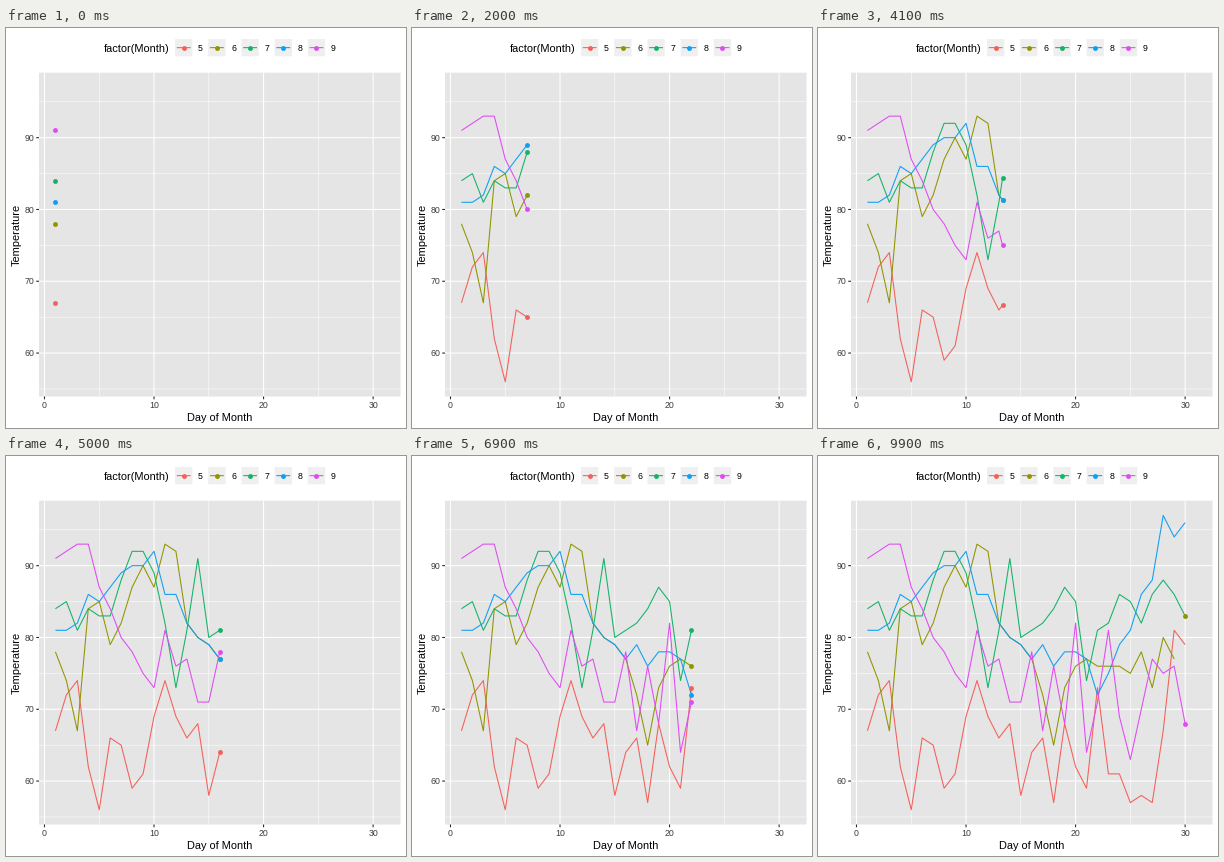
Animation, 400 px wide and 400 px high, one loop 10000 ms. Source, as a matplotlib script:

```python
import matplotlib.pyplot as plt
from matplotlib.animation import FuncAnimation
from matplotlib.patches import Rectangle
import numpy as np

plt.rcParams["font.family"] = "Liberation Sans"
PT = 0.72  # points per pixel at 100 dpi
FRAMES = 100

# Daily temperatures, one list per month
may = [67, 72, 74, 62, 56, 66, 65, 59, 61, 69, 74, 69, 66, 68, 58, 64,
       66, 57, 68, 62, 59, 73, 61, 61, 57, 58, 57, 67, 81, 79, 76]
june = [78, 74, 67, 84, 85, 79, 82, 87, 90, 87, 93, 92, 82, 80, 79, 77,
        72, 65, 73, 76, 77, 76, 76, 76, 75, 78, 73, 80, 77, 83]
july = [84, 85, 81, 84, 83, 83, 88, 92, 92, 89, 82, 73, 81, 91, 80, 81,
        82, 84, 87, 85, 74, 81, 82, 86, 85, 82, 86, 88, 86, 83, 81]
august = [81, 81, 82, 86, 85, 87, 89, 90, 90, 92, 86, 86, 82, 80, 79, 77,
          79, 76, 78, 78, 77, 72, 75, 79, 81, 86, 88, 97, 94, 96, 94]
september = [91, 92, 93, 93, 87, 84, 80, 78, 75, 73, 81, 76, 77, 71, 71, 78,
             67, 76, 68, 82, 64, 71, 81, 69, 63, 70, 77, 75, 76, 68]
months = [may, june, july, august, september]
colors = ["#f5605a", "#929500", "#15b368", "#0f9ff4", "#e04cf2"]

# Panel box in pixels and its data ranges
LEFT, RIGHT, TOP, BOTTOM = 33.0, 394.5, 44.7, 368.5
X0, X1, Y0, Y1 = -0.5, 32.5, 53.95, 99.05


def px(day):
    return LEFT + (np.asarray(day) - X0) / (X1 - X0) * (RIGHT - LEFT)


def py(temp):
    return BOTTOM - (np.asarray(temp) - Y0) / (Y1 - Y0) * (BOTTOM - TOP)


fig = plt.figure(figsize=(4, 4), dpi=100, facecolor="white")
ax = fig.add_axes([0, 0, 1, 1])
ax.set(xlim=(0, 400), ylim=(400, 0))
ax.axis("off")


def stroke(xs, ys, color, width=1.07, z=2):
    return ax.plot(xs, ys, color=color, lw=width * PT, zorder=z, snap=False,
                   solid_capstyle="butt", solid_joinstyle="round")[0]


def dot(x, y, color, z):
    return ax.plot([x], [y], "o", color=color, ms=4.9 * PT, mew=0,
                   zorder=z, snap=False)[0]


def box(x, y, w, h, color):
    ax.add_patch(Rectangle((x, y), w, h, fc=color, lw=0, zorder=1, snap=False))


def label(x, y, s, size=8.8, color="black", ha="center", **kw):
    ax.text(x, y, s, fontsize=size * PT, color=color, ha=ha, va="baseline", **kw)


# Panel, grid and axes
box(LEFT, TOP, RIGHT - LEFT, BOTTOM - TOP, "#e5e5e5")
for d in (5, 15, 25):
    stroke([px(d)] * 2, [TOP, BOTTOM], "white", 0.53)
for t in (55, 65, 75, 85, 95):
    stroke([LEFT, RIGHT], [py(t)] * 2, "white", 0.53)
for d in (0, 10, 20, 30):
    stroke([px(d)] * 2, [TOP, BOTTOM], "white", z=3)
    stroke([px(d)] * 2, [BOTTOM, BOTTOM + 2.75], "#262626", z=3)
    label(px(d), 380.1, str(d), color="#3c3c3c")
for t in (60, 70, 80, 90):
    stroke([LEFT, RIGHT], [py(t)] * 2, "white", z=3)
    stroke([LEFT - 2.75, LEFT], [py(t)] * 2, "#262626", z=3)
    label(28.1, py(t) + 3.15, str(t), color="#3c3c3c", ha="right")
mid_x = (LEFT + RIGHT) / 2
label(mid_x, 392.8, "Day of Month", 11)
label(13.4, (TOP + BOTTOM) / 2, "Temperature", 11,
      rotation=90, rotation_mode="anchor")

# Legend
KEY = 17.28
label(98, 23.6, "factor(Month)", 11, ha="left")
for k, color in enumerate(colors):
    x = 169.05 + 33.2 * k
    box(x, 11, KEY, KEY, "#efefef")
    stroke([x + 0.1 * KEY, x + 0.9 * KEY], [19.64] * 2, color, z=3)
    dot(x + KEY / 2, 19.64, color, 4)
    label(x + KEY + 5.5, 22.8, str(5 + k), ha="left")

lines = [stroke([], [], c, z=5 + k) for k, c in enumerate(colors)]
dots = [dot(0, 0, c, 20 + k) for k, c in enumerate(colors)]

# Each day is pinned to a whole frame
day_frame = np.array([round(d * (FRAMES - 1) / 30) for d in range(31)])


def update(i):
    for k, temps in enumerate(months):
        n = len(temps)
        at = day_frame[:n]
        days = np.arange(1, n + 1)
        final = k == len(months) - 1
        day = np.interp(i, at, days)
        temp = np.interp(i, at, temps)
        if i < at[-1]:
            seen = np.count_nonzero(at <= i)
            xs = np.append(days[:seen], day)
            ys = np.append(temps[:seen], temp)
        else:
            # a finished month drops its closing segment, except the last one
            end = n if final else n - 1
            xs, ys = days[:end], temps[:end]
        lines[k].set_data(px(xs), py(ys))
        dots[k].set_data([px(day)], [py(temp)])
        dots[k].set_visible(bool(final or i != at[-1]))
    return lines + dots


anim = FuncAnimation(fig, update, frames=FRAMES, interval=100, repeat=True,
                     repeat_delay=0, blit=False)
plt.show()
```
